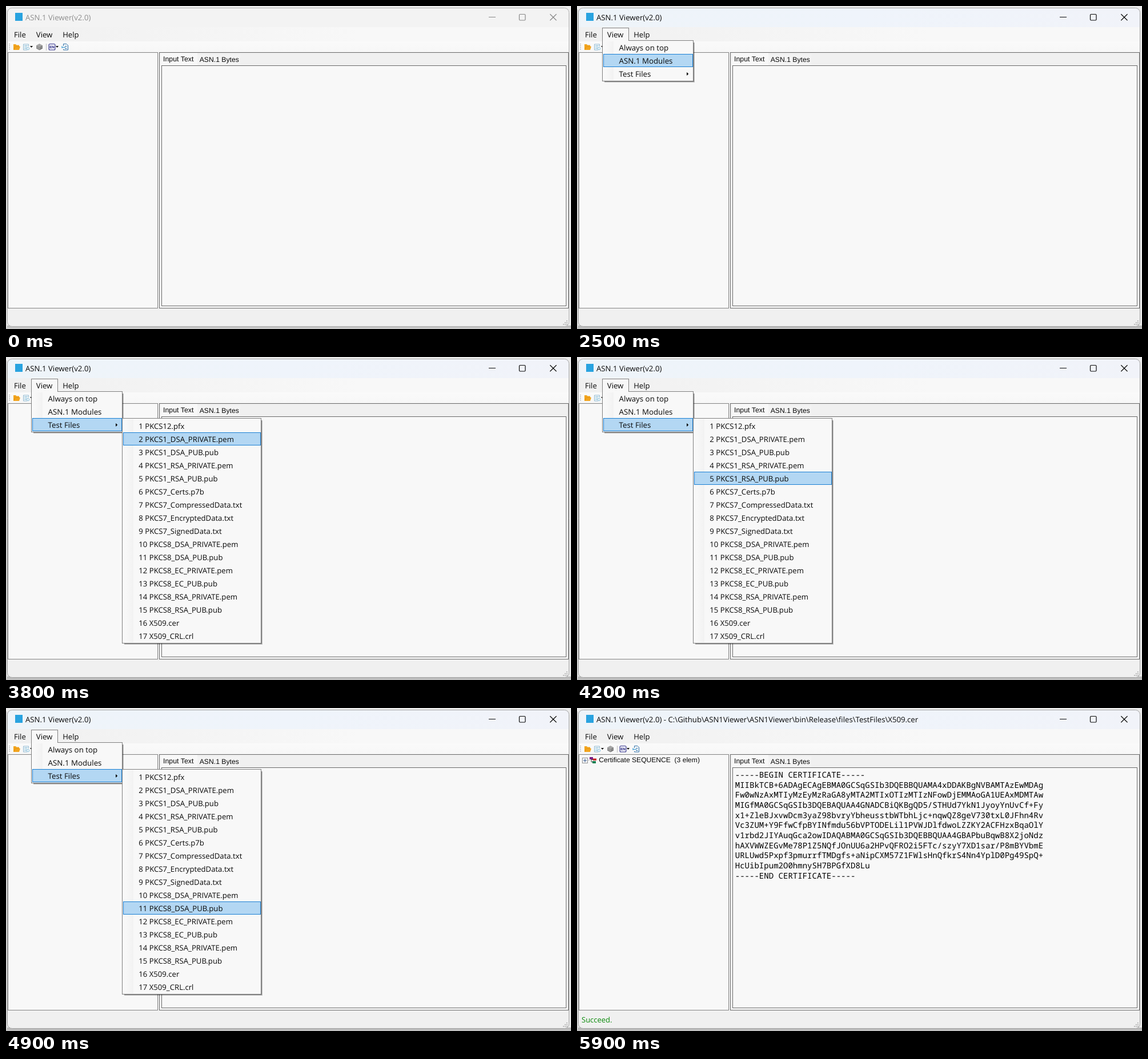
An HTML page with a canvas for the animation above (8 s loop, 989 by 566 pixels).

```html
<!DOCTYPE html>
<html lang="en">
<head>
<meta charset="utf-8">
<title>ASN.1 Viewer</title>
<style>
html, body { margin: 0; width: 100%; height: 100%; overflow: hidden; background: #ececec; }
canvas { display: block; width: 989px; height: 566px; }
</style>
</head>
<body>
<canvas id="stage" width="989" height="566"></canvas>
<script>
const ctx = document.getElementById('stage').getContext('2d');
const LOOP = 8000;
const UI = '"Open Sans", "Noto Sans", sans-serif';
const SANS = '"Liberation Sans", Arial, sans-serif';
const MONO = '"Noto Sans Mono", "DejaVu Sans Mono", monospace';
const PANE = '#f8f8f8', CHROME = '#f0f0f0', LINE = '#696969', INK = '#0a0a0a';

const viewItems = ['Always on top', 'ASN.1 Modules', 'Test Files'];
const testFiles = [
  'PKCS12.pfx', 'PKCS1_DSA_PRIVATE.pem', 'PKCS1_DSA_PUB.pub',
  'PKCS1_RSA_PRIVATE.pem', 'PKCS1_RSA_PUB.pub', 'PKCS7_Certs.p7b',
  'PKCS7_CompressedData.txt', 'PKCS7_EncryptedData.txt', 'PKCS7_SignedData.txt',
  'PKCS8_DSA_PRIVATE.pem', 'PKCS8_DSA_PUB.pub', 'PKCS8_EC_PRIVATE.pem',
  'PKCS8_EC_PUB.pub', 'PKCS8_RSA_PRIVATE.pem', 'PKCS8_RSA_PUB.pub',
  'X509.cer', 'X509_CRL.crl'
];
const certificate = [
  '-----BEGIN CERTIFICATE-----',
  'MIIBkTCB+6ADAgECAgEBMA0GCSqGSIb3DQEBBQUAMA4xDDAKBgNVBAMTAzEwMDAg',
  'Fw0wNzAxMTIyMzEyMzRaGA8yMTA2MTIxOTIzMTIzNFowDjEMMAoGA1UEAxMDMTAw',
  'MIGfMA0GCSqGSIb3DQEBAQUAA4GNADCBiQKBgQD5/STHUd7YkN1JyoyYnUvCf+Fy',
  'x1+ZleBJxvwDcm3yaZ98bvryYbheusstbWTbhLjc+nqwQZ8geV730txL0JFhn4Rv',
  'Vc3ZUM+Y9FfwCfpBYINfmdu56bVPTODELil1PVWJDlfdwoLZZKY2ACFHzxBqaOlY',
  'v1rbd2JIYAuqGca2owIDAQABMA0GCSqGSIb3DQEBBQUAA4GBAPbuBqwB8X2joNdz',
  'hAXVWWZEGvMe78P1Z5NQfJOnUU6a2HPvQFRO2i5FTc/szyY7XD1sar/P8mBYVbmE',
  'URLUwd5Pxpf3pmurrfTMDgfs+aNipCXM57Z1FWlsHnQfkrS4Nn4YplD0Pg49SpQ+',
  'HcUibIpum2O0hmnySH7BPGfXD8Lu',
  '-----END CERTIFICATE-----'
];

// [time, highlighted row] pairs; rows count from 1
const viewSteps = [[2500, 2], [2600, 3]];
const fileSteps = [
  [3800, 2], [4000, 3], [4100, 4], [4200, 5], [4400, 6], [4700, 7], [4800, 9],
  [4900, 11], [5000, 13], [5100, 14], [5200, 15], [5400, 16]
];
const rowAt = (steps, t) => steps.reduce((row, [at, next]) => t >= at ? next : row, 0);

function rect(x, y, w, h, fill) {
  ctx.fillStyle = fill;
  ctx.fillRect(x, y, w, h);
}
function box(x, y, w, h, fill, stroke) {
  rect(x, y, w, h, fill);
  ctx.strokeStyle = stroke;
  ctx.lineWidth = 1;
  ctx.strokeRect(x + .5, y + .5, w - 1, h - 1);
}
function text(str, x, y, size, family = UI, color = INK, weight = 400) {
  ctx.font = `${weight} ${size}px ${family}`;
  ctx.fillStyle = color;
  ctx.fillText(str, x, y);
}
function path(points, color, width = 1) {
  ctx.beginPath();
  points.forEach(([x, y], i) => i ? ctx.lineTo(x, y) : ctx.moveTo(x, y));
  ctx.strokeStyle = color;
  ctx.lineWidth = width;
  ctx.stroke();
}
function polygon(points, color) {
  ctx.beginPath();
  points.forEach(([x, y]) => ctx.lineTo(x, y));
  ctx.fillStyle = color;
  ctx.fill();
}
function gradient(x0, y0, x1, y1, ...colors) {
  const g = ctx.createLinearGradient(x0, y0, x1, y1);
  colors.forEach((c, i) => g.addColorStop(i / (colors.length - 1), c));
  return g;
}
const highlight = (x, y, w, h) => box(x, y, w, h, '#b3d7f3', '#1a80d4');
const caret = x => polygon([[x, 70], [x + 5, 70], [x + 2.5, 73]], INK);

function drawWindow(active) {
  rect(0, 0, 989, 566, active ? '#ebebeb' : '#eeeeee');
  rect(0, 560, 989, 6, gradient(0, 560, 0, 566, '#b4b4b4', active ? '#c4c4c4' : '#d0d0d0'));
  rect(0, 6, 2, 558, active ? '#d0d0d0' : '#dadada');
  ctx.beginPath();
  ctx.roundRect(2.5, 3.5, 983, 558, 8);
  ctx.fillStyle = CHROME;
  ctx.fill();
  ctx.save();
  ctx.clip();
  rect(3, 4, 982, 33, active ? gradient(3, 0, 985, 0, '#eef4f9', '#eff4fb', '#f1f3f9') : '#f3f3f3');
  rect(3, 37, 982, 25, gradient(3, 0, 620, 0, '#f0f0f0', '#f8f8f8'));
  rect(3, 62, 982, 18, gradient(0, 62, 0, 80, '#fafafa', '#f7f7f7'));
  rect(3, 80, 982, 1, '#f2f2f2');
  ctx.restore();
  ctx.beginPath();
  ctx.roundRect(2.5, 3.5, 983, 558, 8);
  ctx.strokeStyle = active ? '#a3a3a3' : '#b0b0b0';
  ctx.lineWidth = 1;
  ctx.stroke();
}

function drawTitle(t, active, loaded) {
  rect(16, 12, 13, 14, '#29a3e0');
  const name = 'ASN.1 Viewer(v2.0)';
  const file = ' - C:\\Github\\ASN1Viewer\\ASN1Viewer\\bin\\Release\\files\\TestFiles\\X509.cer';
  text(loaded ? name + file : name, 34, 24.5, 13.2, UI, active ? INK : '#8e8e8e');
  const fade = 136 + 6 * Math.min(3, Math.floor(t / 100));
  const ink = active ? INK : `rgb(${fade},${fade},${fade})`;
  path([[845, 19.5], [857, 19.5]], ink);
  ctx.beginPath();
  ctx.roundRect(898.5, 14.5, 10.5, 10.5, 1.5);
  ctx.lineWidth = 1.2;
  ctx.stroke();
  path([[952.3, 14.3], [963.5, 25.3]], ink, 1.2);
  path([[963.5, 14.3], [952.3, 25.3]], ink, 1.2);
}

function drawToolbar() {
  for (let y = 66; y < 78; y += 3) rect(5.5, y, 1.3, 1.3, '#999');

  polygon([[13, 67], [17, 67], [18.5, 68.5], [23, 68.5], [23, 71], [25, 71], [23, 77], [13, 77]], '#f2a51f');
  path([[14, 76], [16, 71], [24, 71]], '#e08c0a', .7);

  path([[37, 77], [30.5, 77], [30.5, 67], [39.5, 67], [39.5, 71]], '#8fb9d3');
  [69.5, 72, 74.5].forEach((y, i) => path([[32, y], [38 - i, y]], '#75b7d8', .9));
  ctx.beginPath();
  ctx.arc(38.6, 74.6, 2.1, 0, Math.PI * 2);
  ctx.stroke();
  caret(42);

  polygon([[58.5, 66], [64, 69], [58.5, 72], [53, 69]], '#a5a5a5');
  polygon([[53, 69], [58.5, 72], [58.5, 77.5], [53, 74.5]], '#8b8b8b');
  polygon([[64, 69], [58.5, 72], [58.5, 77.5], [64, 74.5]], '#767676');
  path([[53, 71.5], [58.5, 74.5], [64, 71.5]], '#b8b8b8', .7);

  rect(70, 66, 1, 12, '#bdbdbd');
  ctx.beginPath();
  ctx.roundRect(75, 66.5, 11, 10.5, 2);
  ctx.fillStyle = '#eeeef8';
  ctx.fill();
  ctx.strokeStyle = '#35358c';
  ctx.lineWidth = 1.1;
  ctx.stroke();
  text('EN', 76.2, 74, 6.2, SANS, '#25257d', 700);
  caret(87);

  path([[100.5, 70], [100.5, 66.5], [106, 66.5], [108.5, 69], [108.5, 77], [100.5, 77], [100.5, 75.5]], '#2c6fa8');
  path([[103, 70.5], [106.5, 70.5]], '#2c6fa8');
  path([[103, 74.5], [106.5, 74.5]], '#2c6fa8');
  path([[98, 72.5], [104.5, 72.5]], '#2c91cf');
  path([[98, 70], [98, 74]], '#2c91cf');
}

function drawPanels() {
  box(3, 81, 263, 449, PANE, '#858585');
  box(268, 81, 717, 449, PANE, LINE);
  rect(269, 82, 715, 22, CHROME);
  rect(271, 82, 64, 23, PANE);
  rect(335, 85, 75, 18, '#f3f3f3');
  text('Input Text', 275, 97, 12.4, SANS);
  text('ASN.1 Bytes', 338.7, 98, 12.2, SANS);
  box(272, 104, 709, 422, PANE, LINE);
  for (let row = 0; row < 3; row++)
    for (let col = 0; col <= row; col++)
      rect(981 - col * 3, 551 + row * 3, 1.6, 1.6, '#a0a0a0');
}

function drawResult() {
  box(9, 87, 10, 10, '#fbfbfb', '#919191');
  path([[11, 92], [17, 92]], '#33578c');
  path([[14, 89], [14, 95]], '#33578c');
  for (let x = 19; x < 23; x += 2) rect(x, 91, 1, 1, '#999');
  path([[25, 89], [25, 94.5], [29, 94.5]], '#444');
  path([[25, 90.5], [29, 90.5]], '#444');
  rect(22, 86, 6, 4, '#7c1c86');
  rect(28, 88.5, 6, 3.5, '#cc2929');
  rect(27, 93, 6, 4, '#168052');
  text('Certificate SEQUENCE  (3 elem)', 38.2, 95, 12.1, SANS);
  certificate.forEach((line, i) => text(line, 276.7, 122 + i * 17.68, 14.06, MONO, '#000', 500));
  text('Succeed.', 8, 551, 13, UI, '#0a8a0a');
}

function drawMenuPanel(x, y, w, h) {
  rect(x + 4, y + 4, w - 2, h - 2, 'rgba(0,0,0,.2)');
  rect(x + 4, y + 4, w - 3, h - 3, 'rgba(0,0,0,.35)');
  box(x, y, w, h, PANE, '#808080');
  rect(x + 2, y + 2, 18, h - 4, gradient(x + 2, 0, x + 20, 0, '#fafafa', '#f2f2f2'));
}

function drawMenuBar(hovered, open) {
  if (hovered) highlight(44, 38, 47, 23);
  if (open) box(44, 38, 47, 24, PANE, '#808080');
  text('File', 14, 55, 13.1);
  text('View', 52.8, 55, 13.2);
  text('Help', 99.2, 55, 13.1);
}

function drawMenus(t) {
  drawMenuPanel(44, 60, 160, 72);
  rect(45, 60, 45, 1, PANE);
  const viewRow = rowAt(viewSteps, t);
  if (viewRow) highlight(46, 61 + (viewRow - 1) * 23, 157, 23);
  viewItems.forEach((item, i) => text(item, 73.6, 78 + i * 23, 13.3));
  polygon([[192, 116], [195.3, 119], [192, 122]], INK);

  if (t < 2900) return;
  drawMenuPanel(203, 107, 244, 395);
  const fileRow = rowAt(fileSteps, t);
  if (fileRow) highlight(205, 109 + (fileRow - 1) * 23, 241, 23);
  testFiles.forEach((file, i) => text(`${i + 1} ${file}`, 232.3, 126 + i * 23, 13.15));
}

function render(t) {
  const active = t >= 1300, open = t >= 2000 && t < 5900, loaded = t >= 5900;
  ctx.textRendering = 'geometricPrecision';
  drawWindow(active);
  drawTitle(t, active, loaded);
  drawToolbar();
  drawPanels();
  if (loaded) drawResult();
  drawMenuBar(t >= 700 && t < 2000, open);
  if (open) drawMenus(t);
}

const start = performance.now();
function tick() {
  render((performance.now() - start) % LOOP);
  requestAnimationFrame(tick);
}
tick();
</script>
</body>
</html>
```
